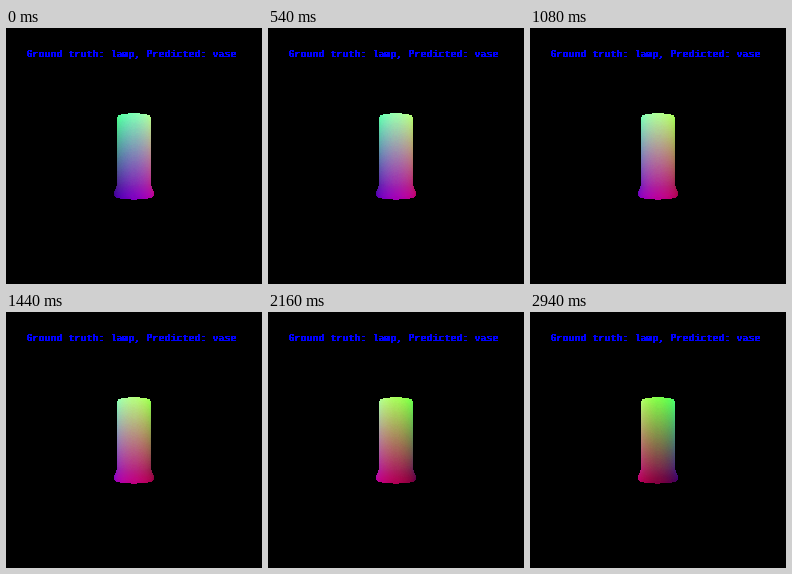
These frames come from a looping animation (256 px wide and 256 px high, 3000 ms). A matplotlib script:

```python
import numpy as np
import matplotlib.pyplot as plt
from matplotlib.animation import FuncAnimation

SIZE, FRAMES, INTERVAL = 256, 50, 60
FOCAL = 222            # pixels, camera at distance 1
HALF = 0.174           # half height of the lamp
SWEEP = np.pi

plt.rcParams["text.hinting"] = "native"
plt.rcParams["text.hinting_factor"] = 1
plt.rcParams["text.antialiased"] = False

rng = np.random.default_rng(4)


def radius(t):
    """Profile of the lamp, t runs from 0 at the foot to 1 at the top."""
    return np.interp(t, [0, 0.035, 0.07, 0.13, 0.99, 1],
                     [0.082, 0.082, 0.0765, 0.0695, 0.0695, 0.068])


def sample(n):
    t = np.concatenate([rng.random(n), rng.random(n // 6) * 0.14,
                        np.repeat([0.0, 1.0], n // 20)])
    phi = rng.random(t.size) * 2 * np.pi
    r = radius(t)
    return np.column_stack([r * np.sin(phi), (2 * t - 1) * HALF, r * np.cos(phi)])


points = sample(13000)
# Colours follow the position in the lamp's bounding cube.
colors = np.clip(0.5 + points * [1.05, 1, 1.05] / (2 * HALF), 0, 1)

fig = plt.figure(figsize=(SIZE / 100, SIZE / 100), dpi=100, facecolor="black")
ax = fig.add_axes([0, 0, 1, 1])
ax.set_xlim(0, SIZE)
ax.set_ylim(SIZE, 0)
ax.axis("off")

# Two copies one pixel apart give a crisp bold bitmap look.
for dx in (0, 1):
    ax.text(20 + dx, 29, "Ground truth: lamp, Predicted: vase", color="#0000ff",
            family="Liberation Mono", size=7.2, va="baseline")
cloud = ax.scatter([], [], s=1.6, marker="o", linewidths=0, antialiased=False)


def update(i):
    a = SWEEP * i / (FRAMES - 1)
    x, y, z = points.T
    side = x * np.cos(a) - z * np.sin(a)
    near = x * np.sin(a) + z * np.cos(a)
    order = np.argsort(near)
    order = order[near[order] > -0.01]
    scale = FOCAL / (1 - near[order])
    cloud.set_offsets(np.column_stack([128 + side[order] * scale,
                                       128.1 - y[order] * scale]))
    cloud.set_facecolors(colors[order])
    return cloud,


anim = FuncAnimation(fig, update, frames=FRAMES, interval=INTERVAL,
                     repeat=True, repeat_delay=0, blit=False)
plt.show()
```
